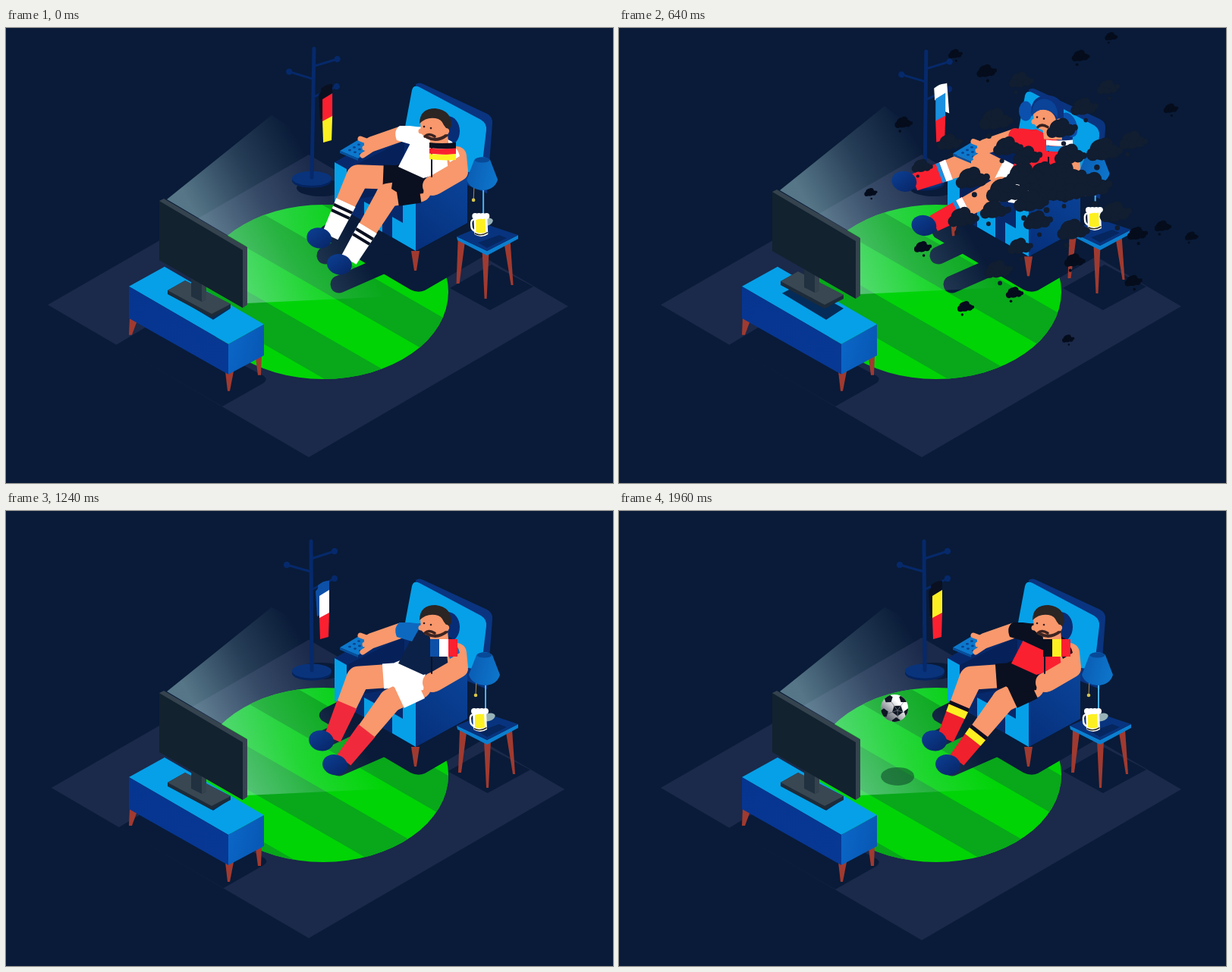
Write an HTML page with a canvas that moves like this. It is 800x600 px and loops after 2 s.

```html
<!DOCTYPE html>
<html lang="en">
<head>
<meta charset="utf-8">
<title>Match night</title>
<style>
html, body { margin: 0; width: 100%; height: 100%; overflow: hidden; background: #091b38; }
canvas { display: block; width: 800px; height: 600px; }
</style>
</head>
<body>
<canvas id="stage" width="800" height="600"></canvas>
<script>
const c = document.getElementById('stage').getContext('2d');
const BG = '#091b38', SKIN = '#f8986c', NAVY = '#06296b', SKY = '#06a0e8', WOOD = '#a03a30';
const BLACK = '#0a1020', WHITE = '#ffffff', RED = '#fb2030', YELLOW = '#fdf022', AZURE = '#1a90e0';

// Sock bands are [offset, width, colour] from the top of the sock
const teams = [
  { until: 400, shirt: WHITE, sleeve: WHITE, shorts: BLACK, sock: WHITE, bands: [[7, 4, BLACK], [15, 4, BLACK]], flag: [BLACK, RED, YELLOW] },
  { until: 1200, shirt: RED, sleeve: RED, shorts: WHITE, sock: RED, bands: [[0, 9, WHITE], [9, 5, AZURE]], flag: [WHITE, AZURE, RED], hat: true },
  { until: 1400, shirt: '#0b2148', sleeve: '#0d69c0', shorts: WHITE, sock: '#f02a3c', bands: [], flag: ['#0d50a8', WHITE, RED], upright: true },
  { until: 2000, shirt: RED, sleeve: BLACK, shorts: BLACK, sock: '#f0202c', bands: [[0, 5, BLACK], [5, 10, YELLOW]], flag: [BLACK, YELLOW, RED], upright: true }
];

// Motion rules
const TAU = Math.PI * 2;
const clamp = v => Math.max(0, Math.min(1, v));
const ramp = (t, from, to) => {
  const p = clamp((t - from) / (to - from));
  return p * p * (3 - 2 * p);
};
const aloft = t => 1 - ramp(t, 640, 860);
// Height of a thing that floats up, hangs at its peak time and lands
const lift = (t, height, peak, span) =>
  height * Math.cos(Math.min(1, Math.abs(t - peak) / span) * Math.PI / 2) * aloft(t);
const kickAt = t => ramp(t, 300, 600) * aloft(t);
const swingAt = t => Math.sin(Math.PI * clamp((t - 700) / 500));

function randomizer(seed) {
  return () => (seed = seed * 16807 % 2147483647) / 2147483647;
}

// Drawing helpers
const fill = (d, col) => { c.fillStyle = col; c.fill(new Path2D(d)); };
const line = (d, col, w) => { c.strokeStyle = col; c.lineWidth = w; c.stroke(new Path2D(d)); };
function oval(x, y, rx, col, ry = rx, rot = 0) {
  c.fillStyle = col;
  c.beginPath();
  c.ellipse(x, y, rx, ry, rot, 0, TAU);
  c.fill();
}
function shifted(dx, dy, draw) {
  c.save();
  c.translate(dx, dy);
  draw();
  c.restore();
}
function grad(x0, y0, x1, y1, ...cols) {
  const g = c.createLinearGradient(x0, y0, x1, y1);
  cols.forEach((col, i) => g.addColorStop(i / (cols.length - 1), col));
  return g;
}

function rug(t) {
  const s = 1 - .014 * ramp(t, 1160, 1240) * (1 - ramp(t, 1640, 1900));
  c.save();
  c.translate(399, 366);
  c.scale(s, s);
  c.translate(-399, -366);
  fill('M55 365L399 167L741 367L399 566Z', '#1b294a');
  fill('M145 418L285 499L338 469Q346 464 340 459L200 385Z', BG);
  fill('M585 343L638 372L695 341L640 312Z', BG);
  c.restore();
}

function pitch(t) {
  c.save();
  c.beginPath();
  c.ellipse(418, 348, 165, 115, 0, 0, TAU);
  c.clip();
  c.fillStyle = grad(340, 240, 440, 460, '#12d026', '#00d408', '#00d404');
  c.fillRect(250, 230, 340, 240);
  const drift = (26 + 11 * Math.cos(TAU * t / 560) * Math.exp(-t / 800)) * aloft(t);
  for (let k = -2; k < 4; k++) {
    const y = 157 + drift + 114 * k;
    fill(`M250 ${y}L590 ${y + 196}V${y + 253}L250 ${y + 57}Z`, '#08a81a');
  }
  c.restore();
  fill('M416 276Q408 267 420 260L470 235L640 250L645 292L552 346Q543 350 533 345Z', BG);
  line('M421 300L480 272M439 338L505 309', BG, 23);
}

function beam(dy) {
  fill(`M212 ${238 + dy}L350 ${127 + dy}L440 172L560 320L508 ${366 + dy}L317 ${375 + dy}V${300 + dy}Z`,
    grad(258, 272 + dy, 402, 190 + dy, 'rgba(180,230,232,.45)', 'rgba(180,228,235,.18)', 'rgba(180,225,235,0)'));
}

function rack(t, team) {
  const up = lift(t, 16, 260, 620), swing = swingAt(t);
  oval(415, 211, 32, BG, 11);
  shifted(403, 212 - up, () => {
    oval(0, 2, 26, '#05245f', 9.5);
    oval(0, -1, 26, '#09347c', 9.5);
    c.rotate((up * .32 + swing * 2) / 175);
    line('M-1 -172L0 -2', NAVY, 5);
    line('M-1 -149L30 -159M-1 -132L-33 -141M-1 -108L30 -123', NAVY, 3);
    for (const [x, y] of [[30, -159], [-33, -141], [30, -123]]) oval(x, y, 4.2, NAVY);
  });
  const rise = lift(t, 23, 330, 760), slant = -swing * 8 / 70;
  c.save();
  c.translate(rise * .23, -rise);
  c.transform(1, 0, slant, 1, -slant * 95, 0);
  const [a, b, d] = team.flag;
  fill(team.hat ? 'M414 97L428 91L431 131L424 128Z' : 'M408 106L414 98V137L410 139Z', a);
  fill('M411 98Q419 91 426 92V106L412 114Z', a);
  fill('M413 112L426 104V136L413 142Z', b);
  fill('M413 141L426 134L425 166L414 169Z', d);
  c.restore();
}

function chair() {
  fill('M437 262H447L442 284H439Z', WOOD);
  fill('M534 311H545L541 337H538Z', WOOD);
  fill('M540 91Q545 88 550 91L634 130Q642 134 641 143L634 235L550 200Z', '#0a347f');
  fill('M535 99Q537 91 545 95L626 138Q634 143 633 152L626 210L518 190Z', SKY);
  fill('M433 194L484 165L528 160L606 205V275L540 311L433 250Z', '#07296c');
  fill('M449 203L525 165L525 232L449 245Z', '#062159');
  fill('M433 194L449 203V259L433 250Z', SKY);
  fill('M472 246L496 259V286L472 272Z', SKY);
  fill('M540 247L608 208V274L540 311Z', grad(540, 300, 608, 220, '#06307c', '#0a4398'));
  fill('M508 232L582 190L608 207L540 247Z', '#05286a');
  fill('M523 237L540 247V311L509 293V266L523 274Z', SKY);
  oval(582, 153, 16, '#072d76', 20);
}

// One leg from joint angles in degrees: shorts, thigh, banded sock and slipper
function leg(hx, hy, thigh, shin, foot, team) {
  const along = (x, y, len, deg) => [x + len * Math.cos(deg * TAU / 360), y + len * Math.sin(deg * TAU / 360)];
  const [kx, ky] = along(hx, hy, thigh.len, thigh.angle);
  const [ax, ay] = along(kx, ky, shin.len, shin.angle);
  const [fx, fy] = along(ax, ay, 18, foot);
  const half = x => 15.5 - 4.5 * x / shin.len;
  const strip = (from, to, col, pad = .6) => fill(
    `M${from} ${-half(from) - pad}L${to} ${-half(to) - pad}V${half(to) + pad}L${from} ${half(from) + pad}Z`, col);
  line(`M${hx} ${hy}L${kx} ${ky}`, SKIN, 31);
  c.save();
  c.translate(kx, ky);
  c.rotate(shin.angle * TAU / 360);
  strip(0, shin.sock + 1, SKIN, 0);
  strip(shin.sock, shin.len + 5, team.sock);
  for (const [x, w, col] of team.bands) strip(shin.sock + x, shin.sock + x + w, col);
  c.restore();
  oval(fx, fy, 16.5, grad(fx - 8, fy - 10, fx + 8, fy + 12, '#0b3b8c', '#08286c'), 13.5, .2);
  c.lineCap = 'butt';
  const [sx, sy] = along(hx, hy, thigh.shorts, thigh.angle);
  line(`M${hx} ${hy}L${sx} ${sy}`, team.shorts, 33);
  c.lineCap = 'round';
}

function head(team) {
  if (team.hat) {
    oval(536, 140, 9, '#0b50ac', 13);
    oval(593, 158, 10, '#0b50ac', 17, -.4);
  }
  fill('M558 160L582 158L584 178L560 177Z', SKIN);
  fill('M546 141Q566 128 581 144L583 159Q578 168 565 168L553 163L547 157Z', SKIN);
  oval(547, 154, 3.5, SKIN);
  if (team.hat) {
    fill('M544 147Q540 122 562 119Q580 119 586 134V154L576 152Q573 139 559 138Q549 138 544 147Z', '#0a327f');
    fill('M544 143Q545 125 560 124Q575 125 578 141V149Q570 138 560 138Q550 138 544 147Z', '#0a4398');
  } else {
    fill('M545 144Q545 124 566 124Q588 127 587 147L583 154L577 146Q574 138 566 137Q554 135 545 144Z', '#2b2524');
    line('M555 162Q568 169 581 159', '#3d2523', 4);
  }
  oval(580, 154, 4.2, SKIN);
  line('M552 161Q557 156 565 161', '#3a2220', 3.5);
  oval(551, 148, 1.3, '#341c20');
  oval(560, 150, 1.3, '#341c20');
}

function handFlag(team) {
  line('M561 171V214', '#0a1228', 2);
  team.flag.forEach((col, i) => {
    if (team.upright) {
      const x = 559 + i * 12;
      fill(`M${x} 169H${x + 12}V192H${x}Z`, col);
    } else {
      const y = 169 + i * 7.5;
      fill(`M558 ${y}Q574 ${y + 2} 593 ${y}V${y + 8}Q574 ${y + 9} 558 ${y + 7}Z`, col);
    }
  });
}

function man(t, team) {
  const rise = lift(t, 26, 290, 560), up = rise / 26, kick = kickAt(t);
  shifted(0, -rise, () => {
    leg(526, 216, { len: 62, angle: 176 + 9 * up + 26 * kick, shorts: 29 },
      { len: 82, angle: 113 + 3 * up + 45 * kick, sock: 38 }, 157 + 22 * kick, team);
    leg(545, 232, { len: 42, angle: 155 + 24 * up + 20 * kick, shorts: 30 },
      { len: 95, angle: 128 - 10 * up + 30 * kick, sock: 51 }, 146 + 18 * kick, team);
    fill('M512 200L522 196L553 214L550 236L524 240L508 230Z', team.shorts);
    // Remote and the arm that holds it
    fill('M440 180L465 165L490 174L464 190Z', '#0d78cc');
    fill('M440 180L464 190V193L440 183Z', '#07509c');
    for (let i = 0; i < 9; i++) {
      const col = i % 3, row = (i - col) / 3;
      oval(453 + col * 7 + row * 6, 179 + col * 2.6 - row * 3.7, 2, '#0a438f', 1.3);
    }
    line('M522 157L482 171', SKIN, 20);
    line('M483 170L467 164M484 174L473 176M482 178L470 186', SKIN, 7);
    // Shirt, sleeves and the flag arm
    fill('M532 150L550 148L588 168L597 190L582 207L550 216L517 201L532 172Z', team.shirt);
    if (team.sleeve === BLACK) fill('M530 150L550 148L588 168L596 188L560 184L534 172Z', BLACK);
    fill('M548 149L532 147L519 147Q510 153 515 166L535 172Z', team.sleeve);
    line('M594 187L596 207L565 225', SKIN, 26);
    oval(562, 226, 13, SKIN);
    fill('M577 172Q594 170 598 187L585 195Z', team.sleeve);
    shifted(0, -16 * kick, () => head(team));
    shifted(5 * kick, -7 * kick, () => handFlag(team));
  });
}

function table(t) {
  const rise = lift(t, 15, 640, 1000), hop = lift(t, 24, 640, 1200);
  shifted(0, -rise, () => {
    shifted(-rise * .3, 0, () => {
      fill('M598 288L607 292L600 345H596Z', WOOD);
      fill('M630 302H639L636 365H633Z', WOOD);
      fill('M659 292L667 288L671 347H668Z', WOOD);
    });
    fill('M594 283L634 302L675 281V286L634 308L595 288Z', '#0b7fd0');
    fill('M594 283L633 267L675 281L634 302Z', '#08347f');
    fill('M622 291L650 281L660 285L634 298Z', '#06265f');
  });
  shifted(-hop * .18, -hop, () => {
    oval(636, 272, 9, '#98b3b8', 5, -.3);
    line('M632 226V270', '#48b2f0', 2);
    line('M620 222L619 243', '#a98a50', 1);
    oval(619, 243, 2.3, '#d8c64c');
    fill('M620 190L610 216Q614 229 632 230Q647 229 651 216L641 190Q631 182 620 190Z', grad(610, 200, 652, 210, '#0a5cb2', '#0d76cc'));
    oval(630.5, 190, 10, '#084a98', 3.5);
  });
  shifted(hop * .08, -hop, () => {
    line('M617 268Q611 268 612 276Q612 283 618 284', WHITE, 2.5);
    fill('M615 265H633L634 288Q625 294 616 288Z', WHITE);
    fill('M618 269L630 266L631 285Q624 288 618 285Z', YELLOW);
    line('M617 287Q625 291 633 286', '#30301c', 1.6);
    for (let i = 0; i < 4; i++) oval(617 + 5 * i, 264, 4, WHITE);
  });
}

function cabinet(dy) {
  shifted(0, dy, () => {
    fill('M163 392L173 396L166 415H162Z', WOOD);
    fill('M289 463L300 463L295 489H292Z', WOOD);
    fill('M329 445L337 441L336 468H332Z', WOOD);
    fill('M162 351L209 325L340 401L293 427Z', SKY);
    fill('M162 351L293 427V467L162 393Z', grad(165, 355, 280, 460, '#063590', '#073894'));
    fill('M293 427L340 401V442L293 467Z', grad(293, 430, 340, 440, '#0a66c6', '#0857b4'));
    fill('M215 360L238 348L296 380L273 395Z', '#052c58');
  });
}

function tv(dy) {
  shifted(0, dy, () => {
    fill('M213 358L236 345L296 376V381L271 394L213 363Z', '#1d2b39');
    fill('M213 358L236 345L296 376L271 389Z', '#394753');
    fill('M244 330L264 342V370L258 373L244 366Z', '#22313f');
    fill('M258 340L264 343V370L258 373Z', '#34424e');
    fill('M202 240L208 237L318 301V377L312 381L204 318Z', '#35434f');
    fill('M202 240L312 305V381L202 318Z', '#12222f');
  });
}

function ball(t) {
  if (t < 1440) return;
  const p = (t - 1560) / 400, x = 302 + 61 * p, y = 291 - 31 * p, spin = 1.2 * p - 1.2;
  oval(318 + 49 * p, 380 - 30 * p, 22, 'rgba(12,70,40,.55)', 12);
  c.save();
  c.beginPath();
  c.arc(x, y, 18, 0, TAU);
  c.clip();
  c.translate(x, y);
  c.rotate(spin);
  c.fillStyle = WHITE;
  c.fillRect(-26, -26, 52, 52);
  const penta = (px, py, r, a) => {
    c.beginPath();
    for (let i = 0; i < 5; i++) c.lineTo(px + r * Math.cos(a + i * TAU / 5), py + r * Math.sin(a + i * TAU / 5));
    c.fillStyle = '#101722';
    c.fill();
  };
  penta(4, 3, 7.5, .3);
  for (let i = 0; i < 5; i++) {
    const a = .3 + i * TAU / 5;
    line(`M4 3L${4 + 14 * Math.cos(a)} ${3 + 14 * Math.sin(a)}`, '#8a929a', .8);
    penta(2 + 17 * Math.cos(a), 1 + 17 * Math.sin(a), 6, a + Math.PI);
  }
  c.rotate(-spin);
  c.fillStyle = grad(-12, 14, 6, -6, 'rgba(10,20,35,.7)', 'rgba(10,20,35,0)');
  c.fillRect(-20, -20, 40, 40);
  c.restore();
}

// White puffs fill a disc; soot flies outward, smaller the farther it gets
const rnd = randomizer(4711);
const puffs = Array.from({ length: 44 }, (_, i) => {
  const d = Math.sqrt((i + .5) / 44), a = i * 2.4;
  return { x: 70 * d * Math.cos(a), y: 68 * d * Math.sin(a), r: 25 - 14 * d + 9 * rnd(), tone: 6 * rnd() - 3 };
});
const soot = Array.from({ length: 46 }, (_, i) => {
  const d = (i + .5) / 46, a = i * 2.4 + .5 * rnd();
  return { x: 235 * d * Math.cos(a), y: 215 * d * Math.sin(a), r: 5 + (1 - d) * (8 + 10 * rnd()), flip: i % 2 ? 1 : -1 };
});

function cloud(t) {
  if (t < 80 || t > 540) return;
  const s = 1 - (1 - clamp((t - 80) / 200)) ** 3 + .2 * ramp(t, 280, 480);
  const dark = ramp(t, 300, 460);
  const col = [222, 228, 236].map((v, i) => v + ([16, 27, 44][i] - v) * dark);
  c.globalAlpha = .95 * (1 - ramp(t, 420, 540));
  for (const p of puffs) oval(545 + p.x * s, 186 + p.y * s, p.r * s, `rgb(${col.map(v => v + p.tone | 0)})`);
  c.globalAlpha = 1;
}

function burst(t) {
  if (t < 340 || t > 900) return;
  const out = 1 - (1 - clamp((t - 340) / 300)) ** 3 + .08 * clamp((t - 640) / 260);
  const size = ramp(t, 320, 480) * (1 - ramp(t, 640, 890));
  for (const p of soot) {
    const r = p.r * size, col = p.r > 9 ? '#111d30' : '#050c1c';
    shifted(552 + p.x * out, 200 + p.y * out, () => {
      oval(0, 0, r, col, r * .9);
      oval(r * .95, r * .15, r * .6, col);
      oval(-r * .75, r * .4, r * .55, col);
      oval(r * .35, -r * .45, r * .6, col);
      oval(r * 1.5, -r * .1 * p.flip, r * .32, col);
      oval(r * .4 * p.flip, r * 1.5, r * .24, col);
    });
  }
}

function draw(t) {
  const team = teams.find(k => t < k.until);
  const tvUp = lift(t, 24, 640, 960);
  c.lineCap = c.lineJoin = 'round';
  c.fillStyle = BG;
  c.fillRect(0, 0, 800, 600);
  rug(t);
  pitch(t);
  beam(-tvUp);
  rack(t, team);
  shifted(0, -lift(t, 24, 260, 520), chair);
  man(t, team);
  table(t);
  ball(t);
  cabinet(-lift(t, 12, 320, 900));
  tv(-tvUp);
  cloud(t);
  burst(t);
}

const start = performance.now();
function tick() {
  draw(Math.max(0, performance.now() - start) % 2000);
  requestAnimationFrame(tick);
}
tick();
</script>
</body>
</html>
```
